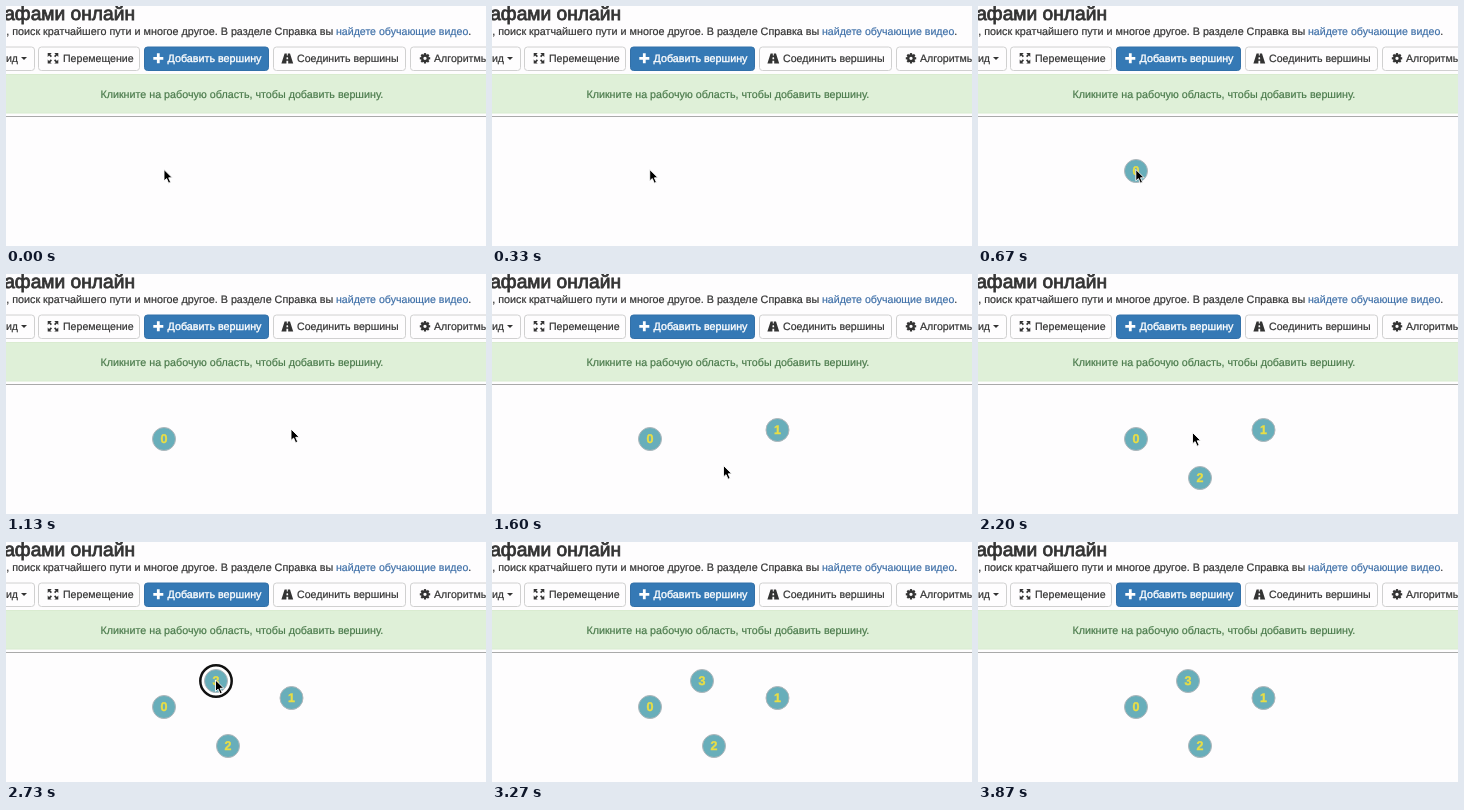
An HTML page that plays this animation: 480x240 px, repeating every 3.94 s.

```html
<!DOCTYPE html>
<html lang="ru">
<head>
<meta charset="utf-8">
<title>Графы</title>
<style>
  html, body { margin: 0; width: 100%; height: 100%; overflow: hidden; background: #fefdfe; }
  svg { display: block; width: 480px; height: 240px; }
  text {
    font: 10.6px "Liberation Sans", Arial, sans-serif;
    fill: #333; stroke: #333; stroke-width: .2px;
    text-rendering: geometricPrecision; white-space: pre;
  }
  .title { font-size: 19.2px; stroke-width: .8px; }
  .intro { font-size: 10.78px; }
  .link { fill: #3f70a8; stroke: #3f70a8; }
  .hint { font-size: 10.72px; fill: #4a7a4b; stroke: #4a7a4b; }
  .button { fill: #fefdfe; stroke: #d0d0d0; }
  .active { fill: #3579b5; stroke: #3270a8; }
  .light { font-size: 10.75px; fill: #fff; stroke: #fff; stroke-width: .35px; }
  .icon { fill: #333; }
  .vertex circle { fill: #68aeba; stroke: #b0b6ba; }
  .vertex .ring { fill: #fff; stroke: #111; stroke-width: 2.5px; }
  .vertex text {
    font-size: 12.5px; font-weight: bold; text-anchor: middle;
    fill: #e9de45; stroke: #e9de45; stroke-width: .4px;
  }
</style>
</head>
<body>
<svg viewBox="0 0 480 240">
  <text class="title" x="129" y="14" text-anchor="end">графами онлайн</text>
  <text class="intro" x="327.3" y="28.7" text-anchor="end">, поиск кратчайшего пути и многое другое. В разделе Справка вы</text>
  <text x="330" y="28.7"><tspan class="link">найдете обучающие видео</tspan>.</text>

  <g id="buttons"></g>
  <text x="12" y="56" text-anchor="end">Вид</text>
  <path class="icon" d="M15 51h6l-3 3z"/>
  <text x="57" y="56" font-size="10.5">Перемещение</text>
  <text class="light" x="161.5" y="56">Добавить вершину</text>
  <text x="291" y="56">Соединить вершины</text>
  <text x="428" y="56">Алгоритмы</text>

  <g id="expand" class="icon" transform="translate(47 52.3)"></g>
  <path d="M147.3 52.3h10M152.3 47.3v10" stroke="#fff" stroke-width="2.8"/>
  <path class="icon" d="M278.6 47.5h2.2v2h1v-2h2.2l3.2 10h-5v-2.8h-1.8v2.8h-5zM280.6 51.2l-.2 2h1.8l-.2-2z" fill-rule="evenodd"/>
  <g id="gear" class="icon" transform="translate(419 52.3)">
    <circle r="2.8" fill="none" stroke="#333" stroke-width="2.3"/>
  </g>

  <rect x="-8" y="68.5" width="496" height="38.5" fill="#dff0d8" stroke="#d9ebd0"/>
  <text class="hint" x="235.8" y="91.6" text-anchor="middle">Кликните на рабочую область, чтобы добавить вершину.</text>
  <path d="M0 110.5h480" stroke="#aaa"/>

  <g id="vertices"></g>
  <path id="cursor" d="M0 0v11.4l2.6-2.3 2 4.6 2.1-.9-2-4.5h3.6z" fill="#000" stroke="#fff" stroke-width=".9"/>
</svg>
<script>
const LOOP = 3940, FRAME = 1000 / 15;
const $ = id => document.getElementById(id);

function add(parent, tag, attrs, content = "") {
  const node = document.createElementNS("http://www.w3.org/2000/svg", tag);
  for (const key in attrs) node.setAttribute(key, attrs[key]);
  node.textContent = content;
  return parent.appendChild(node);
}

// left, right, class
[[-20, 29, "button"], [32, 134, "button"], [138, 263, "active"],
 [267, 400, "button"], [404, 510, "button"]].forEach(([left, right, cls]) =>
  add($("buttons"), "rect", { class: cls, x: left + .5, y: 41, width: right - left - 1, height: 23.5, rx: 3 }));

for (let i = 0; i < 4; i++)
  add($("expand"), "path", { d: "M5.3-5.3v4l-1.4-1.4-1.7 1.7-1.2-1.2 1.7-1.7-1.4-1.4z", transform: `rotate(${i * 90})` });
for (let i = 0; i < 8; i++)
  add($("gear"), "rect", { x: -1.1, y: -5.2, width: 2.2, height: 2, transform: `rotate(${i * 45})` });

const vertices = [
  { x: 158, y: 165, born: 470, ring: [730, 870] },
  { x: 285.5, y: 156, born: 1200, ring: [1330, 1400] },
  { x: 222, y: 204, born: 1800, ring: [1930, 2060] },
  { x: 210, y: 139, born: 2470, ring: [2660, 2930] }
];
vertices.forEach((vertex, i) => {
  vertex.node = add($("vertices"), "g", { class: "vertex", transform: `translate(${vertex.x} ${vertex.y})` });
  vertex.halo = add(vertex.node, "circle", { class: "ring", r: 15.7 });
  add(vertex.node, "circle", { r: 11.5 });
  add(vertex.node, "text", { y: 4.4 }, i);
});

// time, x, y
const path = [
  [0, 158, 163.5], [600, 157.5, 163.5], [720, 158, 163.5], [1130, 285, 155],
  [1330, 285, 155], [1600, 231.5, 191.5], [1730, 221.5, 202.5], [1930, 221.5, 202.5],
  [2200, 214.5, 158.5], [2400, 209.5, 138], [2800, 209.5, 138], [3200, 215, 252]
];

function pointerAt(t) {
  const next = path.findIndex(step => step[0] > t);
  if (next < 0) return path[path.length - 1].slice(1);
  const [t0, x0, y0] = path[next - 1], [t1, x1, y1] = path[next];
  const p = (t - t0) / (t1 - t0), ease = p * p * (3 - 2 * p);
  return [x0 + (x1 - x0) * ease, y0 + (y1 - y0) * ease];
}

const show = (node, on) => node.setAttribute("visibility", on ? "visible" : "hidden");

function draw(now) {
  const t = Math.floor((now % LOOP + 4) / FRAME) * FRAME + 4;
  for (const { node, halo, born, ring } of vertices) {
    show(node, t >= born);
    show(halo, t >= ring[0] && t < ring[1]);
  }
  $("cursor").setAttribute("transform", `translate(${pointerAt(t).join(" ")})`);
}

const start = performance.now();
function tick() {
  draw(performance.now() - start);
  requestAnimationFrame(tick);
}
tick();
</script>
</body>
</html>
```
